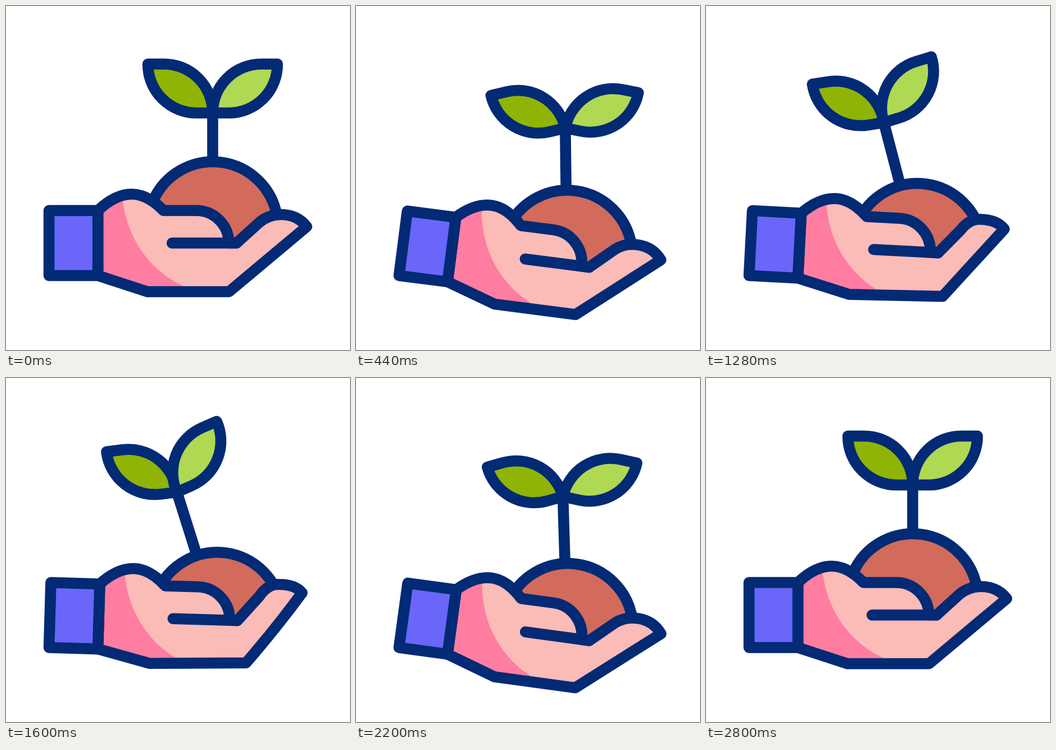
These frames come from a looping animation (640 by 640 pixels, 3000 ms). An HTML page:

```html
<!DOCTYPE html>
<html lang="en">
<head>
<meta charset="utf-8">
<title>Sprout in hand</title>
<style>
  html, body { margin: 0; height: 100%; overflow: hidden; background: #fff; }
  svg { display: block; width: 100vw; height: 100vh; }
  path { fill: none; stroke: #032a75; stroke-width: 20.5; stroke-linecap: round; stroke-linejoin: round; }
</style>
</head>
<body>
<svg viewBox="0 0 640 640">
  <path id="stem"/>
  <path id="left" d="M0 0H-30A90.5 90.5 0 0 1-120.5-91H-90.5A90.5 90.5 0 0 1 0 0Z" style="fill:#8fb406"/>
  <path id="right" d="M0 0H30A90.5 90.5 0 0 0 120.5-91H90.5A90.5 90.5 0 0 0 0 0Z" style="fill:#afd853"/>
  <path id="ball" d="M-111-48A121 121 0 0 1 120-17L40 50H-40Z" style="fill:#d26b5b"/>
  <g id="hand">
    <path id="skin" style="fill:#fbbbb7;stroke:none"/>
    <path id="shade" style="fill:#ff7da0;stroke:none"/>
    <path id="outline"/>
    <path d="M309 441H429"/>
    <path d="M80 380.5H171V501.5H80Z" style="fill:#6a66f9"/>
  </g>
</svg>
<script>
const $ = id => document.getElementById(id);
const set = (id, name, value) => $(id).setAttribute(name, value);

// tilt, finger bend, ball x y, stem base x y, stem top x y, left leaf, right leaf
const rest = [0, 0, 384.5, 411, 384.5, 290, 384.5, 199, 0, 0];
const low  = [9, 0, 394.5, 476, 392.3, 355, 390.5, 233.5, -16.4, 13.8];
const high = [1, 1, 392.5, 443.2, 351.8, 329, 311, 211.4, -6.3, -27.4];
const land = [8.05, 0, 394.5, 468.7, 389, 348, 385, 221.3, -16.5, 13.3];
const keys = [[0, rest], [75, rest], [580, low], [870, low], [1480, high], [2120, land], [2795, rest], [3000, rest]];

const smooth = p => p * p * (3 - 2 * p);

function poseAt(t) {
  const i = keys.findIndex(([end]) => t < end);
  const [t0, a] = keys[i - 1], [t1, b] = keys[i];
  const k = smooth((t - t0) / (t1 - t0));
  return a.map((v, n) => v + (b[n] - v) * k);
}

function draw(t) {
  const [tilt, bend, ballX, ballY, baseX, baseY, topX, topY, left, right] = poseAt(t);
  const at = (x, y, dx, dy) => `${x + dx * bend} ${y + dy * bend} `;
  const bulge = t > 1480 ? 45 * bend * (1 - bend) : 0;
  const heel = at(263, 531.5, 6, -6.5);
  const palm = 'M171 380.5Q203 350 234 350Q263 350 293 380.5H354A60.5 60.5 0 0 1 414.5 441H429' +
    'L' + at(472, 402, -4, -8) +
    'Q' + at(489, 388, -6, -19) + at(512, 388, -8, -18) +
    'Q' + at(542, 388, -9, -19) + at(559.5, 410.5, -13, -27) +
    'Q' + at(487 + bulge * .64, 471 + bulge * .77, 11, -20) + at(415, 531.5, 35.5, -13.4) +
    'L' + heel + 'L171 501.5Z';

  set('skin', 'd', palm);
  set('outline', 'd', palm);
  set('shade', 'd', `M171 380.5L216 352C222 425 262 490 332 522L${heel}L171 501.5Z`);
  set('hand', 'transform', `rotate(${tilt} 80 501.5)`);
  set('ball', 'transform', `translate(${ballX} ${ballY})`);
  set('stem', 'd', `M${baseX} ${baseY}L${topX} ${topY}`);
  set('left', 'transform', `translate(${topX} ${topY}) rotate(${left})`);
  set('right', 'transform', `translate(${topX} ${topY}) rotate(${right})`);
}

function tick() {
  draw(performance.now() % 3000);
  requestAnimationFrame(tick);
}
tick();
</script>
</body>
</html>
```
